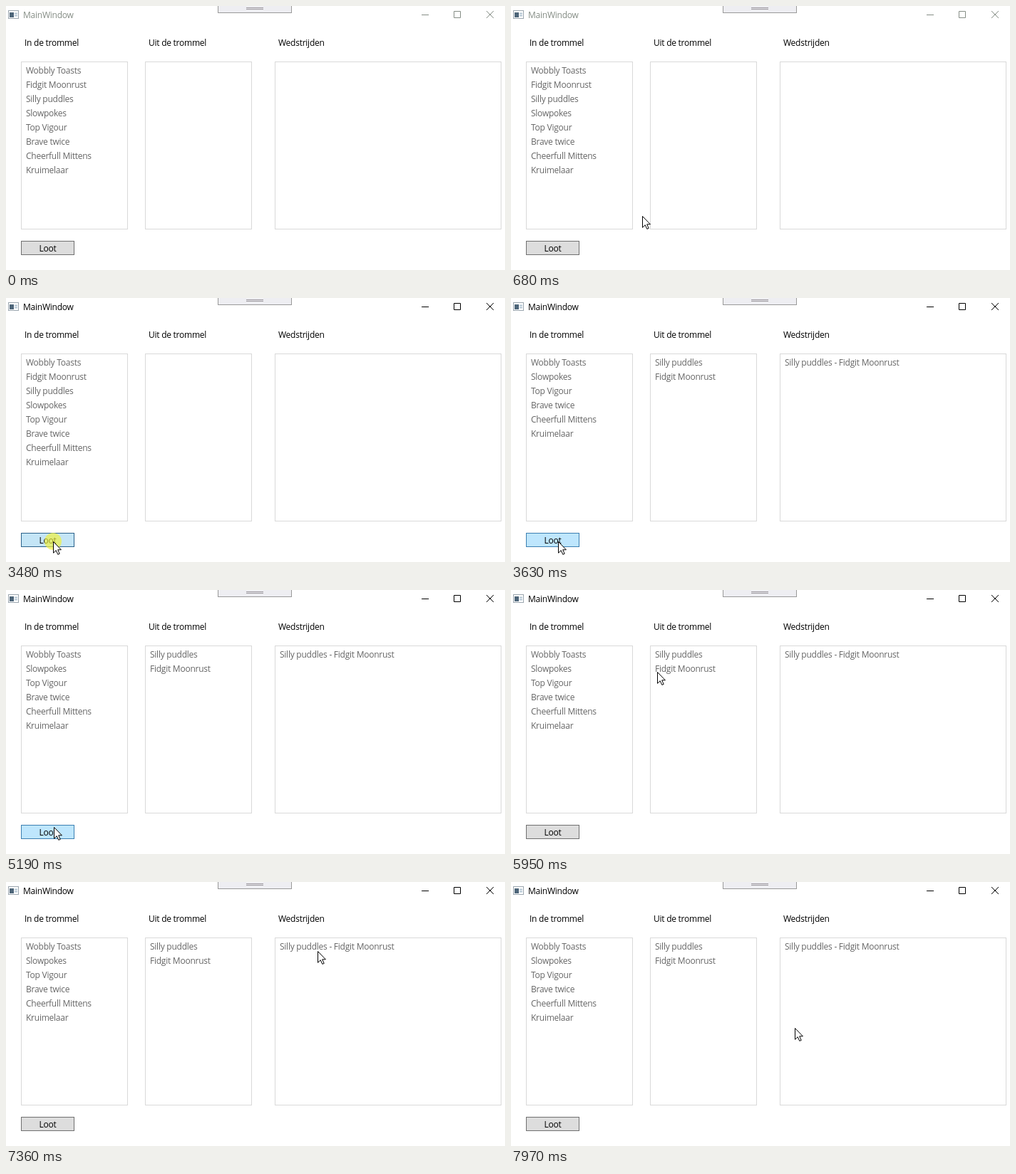
Recreate the animation shown at these times as an HTML page. Size 700 by 371 pixels, loop 8 s.

```html
<!DOCTYPE html>
<html lang="nl">
<head>
<meta charset="utf-8">
<title>MainWindow</title>
<style>
  html, body { margin: 0; width: 100%; height: 100%; overflow: hidden; background: #fff; }
  svg { display: block; width: 700px; height: 371px; }
  text { font: 12px "Open Sans", "Noto Sans", sans-serif; letter-spacing: -.25px; fill: #000; white-space: pre; }
  .list text { fill: #666; }
  .box { fill: #fff; stroke: #d9d9d9; }
  .chrome { fill: none; stroke: currentColor; }
  #title { fill: currentColor; }
</style>
</head>
<body>
<svg viewBox="0 0 700 371">
  <rect width="700" height="371" fill="#fff"/>

  <g id="icon">
    <rect x="3.5" y="6.5" width="14" height="11" fill="#fff" stroke="#9aa5ae"/>
    <rect x="5" y="9" width="6" height="7" fill="#4d6579"/>
    <path d="M12 10.5H16M12 13.5H16" stroke="#b4c6d4" stroke-width="2"/>
  </g>

  <g id="frame">
    <text id="title" x="24" y="17">MainWindow</text>
    <path class="chrome" d="M583 12.5H593M628.5 7.5H637.5V16.5H628.5Z"/>
    <path class="chrome" d="M674 7L684 17M684 7L674 17"/>
  </g>

  <rect x="297.5" y="-.5" width="103" height="10" fill="#eeeef2" stroke="#999"/>
  <path d="M337 2.5H361M337 4.5H361" stroke="#98949a"/>

  <text x="26" y="56">In de trommel</text>
  <text x="200" y="56">Uit de trommel</text>
  <text x="382" y="56">Wedstrijden</text>

  <rect class="box" x="21.5" y="78.5" width="149" height="235"/>
  <rect class="box" x="195.5" y="78.5" width="149" height="235"/>
  <rect class="box" x="377.5" y="78.5" width="317" height="235"/>
  <g class="list" id="before"></g>
  <g class="list" id="after"></g>

  <rect id="button" x="21.5" y="330.5" width="74" height="19"/>
  <text x="46.5" y="345">Loot</text>

  <circle id="halo" cx="66" cy="342" r="12" fill="#f0f03c" fill-opacity=".68"/>
  <path id="cursor" d="M.5 .5V16.3L4.2 12.7L6.8 18.4L9.2 17.4L6.7 11.8H11.4Z"
        fill="#fff" stroke="#000"/>
</svg>
<script>
const LOOP = 8000, STEP = 77, PRESS = 3480, RELEASE = 3550, HALO_END = 3630;
const el = id => document.getElementById(id);

const teams = ["Wobbly Toasts", "Fidgit Moonrust", "Silly puddles", "Slowpokes",
  "Top Vigour", "Brave twice", "Cheerfull Mittens", "Kruimelaar"];
const drawn = [teams[2], teams[1]];

function addList(group, x, rows) {
  rows.forEach((row, i) => {
    const text = document.createElementNS("http://www.w3.org/2000/svg", "text");
    text.setAttribute("x", x);
    text.setAttribute("y", 95 + 20 * i);
    text.textContent = row;
    group.append(text);
  });
}
addList(el("before"), 28, teams);
addList(el("after"), 28, teams.filter(team => !drawn.includes(team)));
addList(el("after"), 202, drawn);
addList(el("after"), 384, [drawn.join(" - ")]);

// Each pointer move follows a quadratic curve; the pointer rests between moves.
const moves = [
  { start: 60, end: 830, from: [480, 364], bend: [290, 236], to: [113, 320] },
  { start: 910, end: 1290, from: [100, 326], bend: [72, 340], to: [66, 342] },
  { start: 5190, end: 5950, from: [67, 333], bend: [150, 150], to: [205, 115] },
  { start: 6030, end: 6730, from: [206, 112], bend: [218, 60], to: [225, 113] },
  { start: 6820, end: 7660, from: [248, 111], bend: [420, 98], to: [517, 92] },
  { start: 7740, end: 7970, from: [490, 112], bend: [428, 170], to: [398, 205] }
];

function pointerAt(t) {
  const move = moves.findLast(({ start }) => t >= start);
  if (!move) return null;
  const { start, end, from, bend, to } = move;
  const steps = Math.round((end - start) / STEP);
  const u = Math.min(1, Math.floor((t - start) / (end - start) * steps + 0.1) / steps);
  const v = 1 - u;
  return from.map((p, axis) =>
    Math.round(v * v * p + 2 * u * v * bend[axis] + u * u * to[axis]));
}

function buttonStyle(t, pointer) {
  if (t >= PRESS && t < RELEASE) return ["#c4e5f6", "#2c628b"];
  const hover = pointer && pointer[0] < 96 && pointer[1] >= 330;
  return hover ? ["#bee6fd", "#3c7fb1"] : ["#dddddd", "#707070"];
}

const show = (id, visible) => el(id).setAttribute("visibility", visible ? "visible" : "hidden");

function render(t) {
  const pointer = pointerAt(t);
  const [fill, stroke] = buttonStyle(t, pointer);
  el("button").setAttribute("fill", fill);
  el("button").setAttribute("stroke", stroke);
  el("frame").setAttribute("color", t < PRESS ? "#858d85" : "#000");
  show("before", t < RELEASE);
  show("after", t >= RELEASE);
  show("halo", t >= PRESS && t < HALO_END);
  el("halo").setAttribute("opacity", t < RELEASE ? 1 : 0.5);
  show("cursor", pointer);
  if (pointer) el("cursor").setAttribute("transform", `translate(${pointer})`);
}

const began = performance.now();
function tick() {
  render((performance.now() - began) % LOOP);
  requestAnimationFrame(tick);
}
tick();
</script>
</body>
</html>
```
